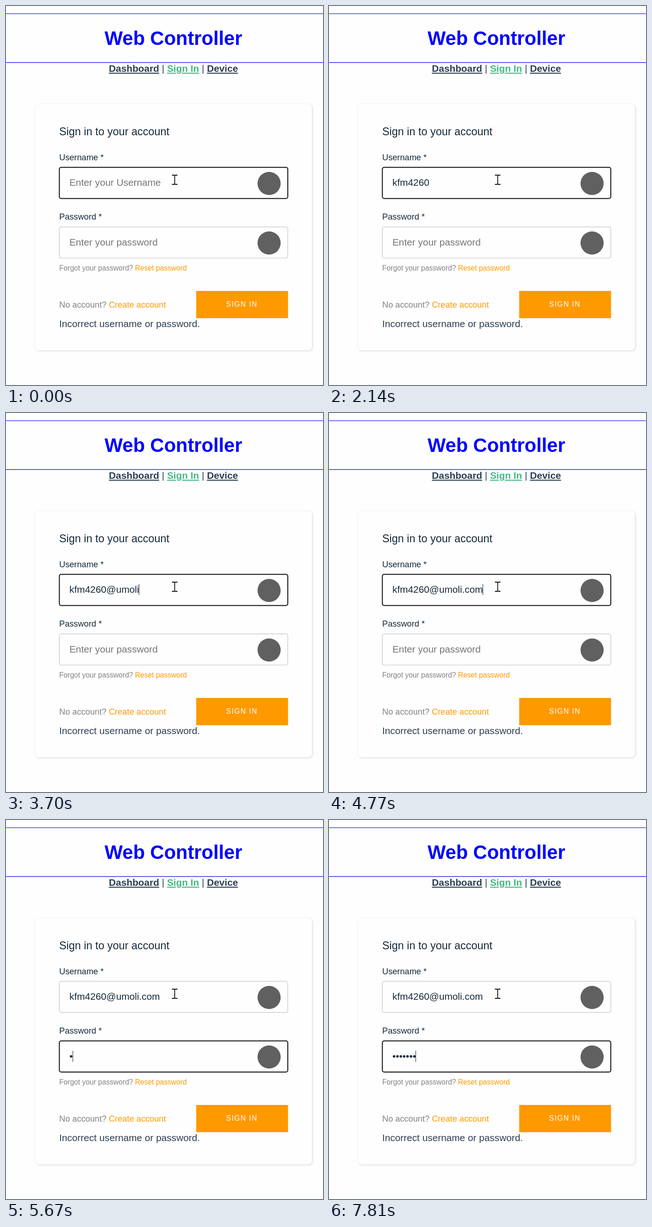
An HTML page for the animation above (8 s loop, 685 by 818 pixels).

```html
<!DOCTYPE html>
<html lang="en">
<head>
<meta charset="utf-8">
<title>Web Controller</title>
<style>
  html, body { margin: 0; width: 100%; height: 100%; overflow: hidden; background: #fefefe; }
  .card {
    position: absolute; left: 63px; top: 211.5px; width: 598px; height: 531.5px;
    border-radius: 7.8px; background: #fefefe;
    box-shadow: 1.3px 1.3px 5.2px rgba(0, 0, 0, .15);
  }
  svg { position: absolute; left: 0; top: 0; display: block; }
  text { font-family: "Liberation Sans", Arial, sans-serif; fill: #152939; white-space: pre; }
  .brand { font-size: 41.6px; font-weight: bold; fill: #00f; }
  .body, .entry { font-size: 20.8px; }
  .body { fill: #2c3e50; }
  .link { font-weight: bold; text-decoration: underline; }
  .active { fill: #42b983; }
  .title { font-size: 23.4px; }
  .label { font-size: 18.2px; }
  .hint { font-size: 15.6px; }
  .muted { fill: #828282; }
  .action { fill: #f90; }
  .button { font-size: 15.6px; letter-spacing: 1.43px; fill: #fff; }
  .field { fill: #fefefe; stroke: #c4c4c4; stroke-width: 1.2; }
  .field.focus { stroke: #101010; stroke-width: 2; }
  .entry.empty { fill: #757575; }
</style>
</head>
<body>
<div class="card"></div>
<svg width="685" height="818" viewBox="0 0 685 818">
  <path d="M0 16.6H685M0 122H685" stroke="#00f" stroke-width="1.3" opacity=".85"/>
  <text class="brand" x="213" y="84">Web Controller</text>
  <text class="body" x="222.3" y="142"><tspan class="link">Dashboard</tspan> | <tspan class="link active">Sign In</tspan> | <tspan class="link">Device</tspan></text>

  <text class="title" x="115" y="278.5">Sign in to your account</text>
  <text class="label" x="115" y="332.5">Username *</text>
  <rect class="field" x="115.3" y="348.2" width="493.6" height="67.2" rx="3.9"/>
  <text class="entry" x="137" y="388"></text>
  <text class="label" x="115" y="461">Password *</text>
  <rect class="field" x="115.3" y="476.8" width="493.6" height="67.2" rx="3.9"/>
  <text class="entry" x="137" y="517"></text>
  <g fill="#606060"><circle cx="568.5" cy="383" r="25"/><circle cx="568.5" cy="511.5" r="25"/></g>
  <rect id="caret" width="1" height="24" fill="#152939"/>

  <text class="hint muted" x="115" y="571.3">Forgot your password? <tspan class="action">Reset password</tspan></text>
  <text class="label muted" x="115" y="650.5">No account? <tspan class="action">Create account</tspan></text>
  <rect x="411" y="615" width="198.5" height="58.8" fill="#f90"/>
  <text class="button" x="475.6" y="649">SIGN IN</text>
  <text class="body" x="115" y="693">Incorrect username or password.</text>

  <path d="M358.5 365h4q2 0 2 2v16q0 2-2 2h-4M370.5 365h-4q-2 0-2 2M370.5 385h-4q-2 0-2-2"
        fill="none" stroke="#111" stroke-width="1.8"/>
</svg>
<script>
  const LOOP = 8000;
  const values = ['kfm4260@umoli.com', '•'.repeat(7)];
  const placeholders = ['Enter your Username', 'Enter your password'];
  const fields = document.querySelectorAll('.field');
  const entries = document.querySelectorAll('.entry');
  const caret = document.getElementById('caret');

  // Key press times for each field, and spans in which the caret is hidden.
  const keys = [
    [170, 430, 770, 1130, 1300, 1460, 1630, 2390, 2570, 2760, 2940, 3270, 3700, 4150, 4420, 4600, 4770],
    [5670, 6130, 6370, 6730, 7080, 7580, 7810]
  ];
  const hidden = [[0, 170], [2140, 2390], [5490, 5670]];
  const focusChange = 4980;

  function draw(t) {
    const focus = t < focusChange ? 0 : 1;
    entries.forEach((entry, i) => {
      const count = keys[i].filter(k => k <= t).length;
      const text = count ? values[i].slice(0, count) : placeholders[i];
      if (entry.textContent !== text) entry.textContent = text;
      entry.classList.toggle('empty', !count);
      fields[i].classList.toggle('focus', i === focus);
      if (i === focus) {
        const width = count ? entry.getComputedTextLength() : 0;
        caret.setAttribute('x', Math.floor(137 + width));
        caret.setAttribute('y', i ? 498 : 369);
      }
    });
    const off = hidden.some(([from, to]) => t >= from && t < to);
    caret.setAttribute('visibility', off ? 'hidden' : 'visible');
  }

  const start = performance.now();
  function tick(now) {
    draw(Math.max(0, now - start) % LOOP);
    requestAnimationFrame(tick);
  }
  draw(0);
  requestAnimationFrame(tick);
</script>
</body>
</html>
```
